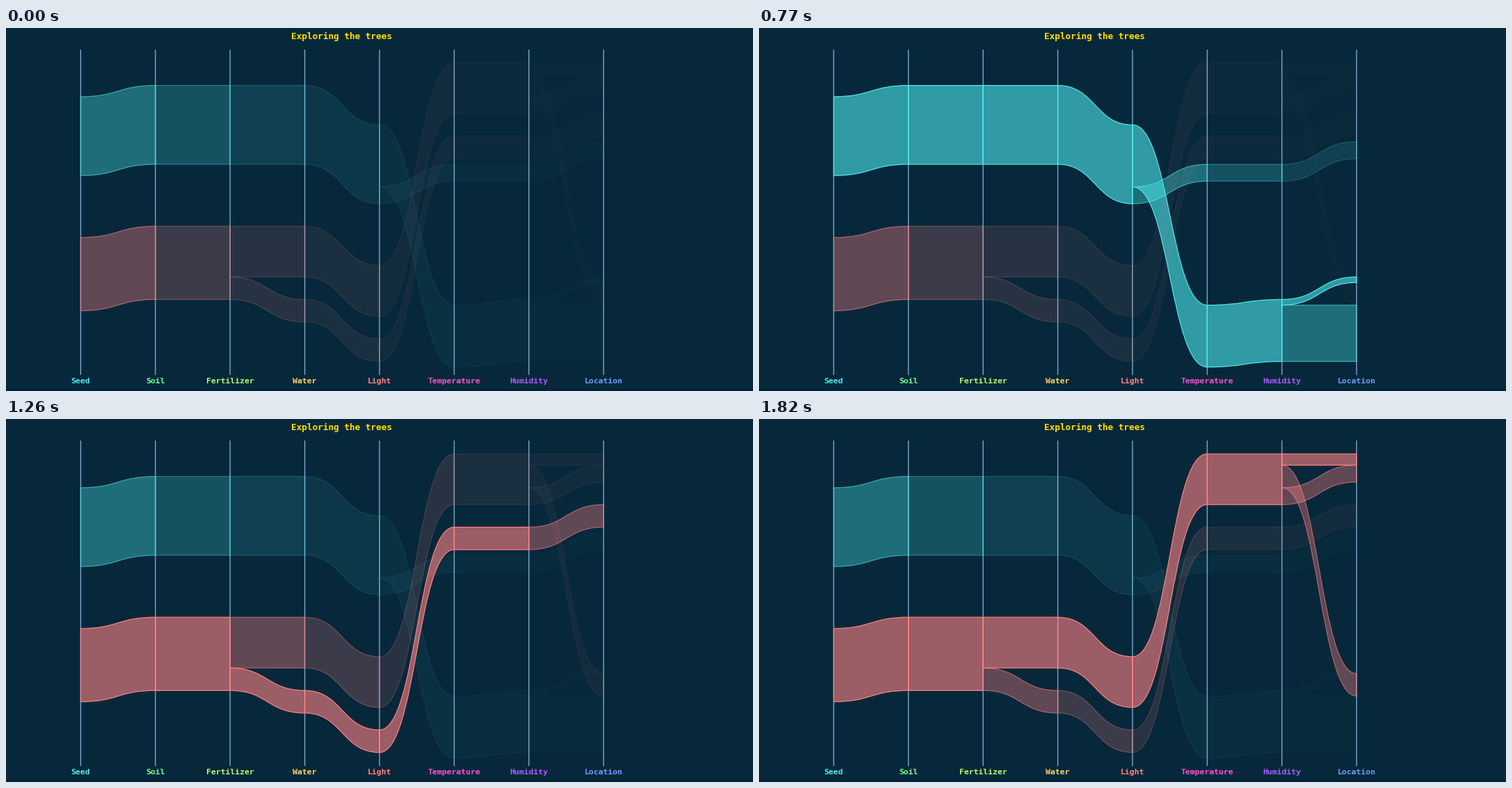
Animation of 1074 by 522 pixels, one loop 1.89 s. Source, as a matplotlib script:

```python
import matplotlib.pyplot as plt
from matplotlib.animation import FuncAnimation
from matplotlib.patches import PathPatch, Rectangle
from matplotlib.path import Path

W, H, DPI = 1074, 522, 100
STEP = 107.4           # distance between the axes
TOP, UNIT = 50.2, 8.1  # first slot and height of one item
FADE = 0.6             # opacity factor per link away from the lit path
PX = 72 / DPI          # one pixel in points

BG = "#07283a"
TEAL, RED = "#4de8ee", "#ff8284"
LABELS = [("Seed", "#4fe6f0"), ("Soil", "#78fa9c"), ("Fertilizer", "#b4fa6e"),
          ("Water", "#fad264"), ("Light", "#ff8284"), ("Temperature", "#fa50d2"),
          ("Humidity", "#aa5aff"), ("Location", "#6e9bff")]

fig = plt.figure(figsize=(W / DPI, H / DPI), dpi=DPI, facecolor=BG)
ax = fig.add_axes([0, 0, 1, 1])
ax.set_xlim(0, W)
ax.set_ylim(H, 0)
ax.axis("off")


class Node:
    """A group of items on one axis, with the ribbon leading to it."""

    def __init__(self, top, size, color, parent=None):
        self.top, self.size, self.color, self.parent = top, size, color, parent
        self.kids = []
        self.col = parent.col + 1 if parent else 0
        if parent:
            start = parent.top + sum(k.size for k in parent.kids)
            parent.kids.append(self)
            self.patch = PathPatch(ribbon(self.col, start, top, size),
                                   lw=1.2 * PX, joinstyle="round", zorder=3)
            ax.add_patch(self.patch)

    def grow(self, size, *tops):
        node = self
        for top in tops:
            node = Node(top, size, self.color, node)
        return node

    def walk(self):
        yield self
        for kid in reversed(self.kids):
            yield from kid.walk()

    def paint(self, lit):
        steps, node = 0, self
        while node.parent and node not in lit:
            steps, node = steps + 1, node.parent
        self.patch.set_facecolor((self.color, FADE ** (steps + 1)))
        self.patch.set_edgecolor((self.color, FADE ** steps))


def ribbon(col, start, end, size):
    x0, x1 = STEP * col, STEP * (col + 1)
    mid = (x0 + x1) / 2
    a, b = TOP + UNIT * start, TOP + UNIT * end
    h = UNIT * size
    points = [(x0, a), (mid, a), (mid, b), (x1, b),
              (x1, b + h), (mid, b + h), (mid, a + h), (x0, a + h), (x0, a)]
    curve = [Path.CURVE4] * 3
    return Path(points, [Path.MOVETO, *curve, Path.LINETO, *curve, Path.CLOSEPOLY])


def text(x, y, s, size, color):
    ax.text(x, y, s, color=color, fontsize=size * PX, weight="bold",
            family="DejaVu Sans Mono", ha="center", va="baseline", zorder=5)


ax.add_patch(Rectangle((0, 519), W, 3, color="#05203a", lw=0))
text(482.8, 15.6, "Exploring the trees", 12.7, "#ffdc00")
for i, (name, color) in enumerate(LABELS, 1):
    ax.plot([STEP * i] * 2, [31, 499], color="#78a8ce", lw=1.4 * PX,
            solid_capstyle="butt", snap=False, zorder=2)
    text(STEP * i, 510.8, name, 11.45, color)

# Ribbons hang below each other in the order in which they are grown.
teal = Node(6, 14, TEAL)
light = teal.grow(14, 4, 4, 4, 11)
humid = light.grow(11, 43, 42)
humid.grow(1, 38)
humid.grow(10, 43)
light.grow(3, 18, 18, 14)

red = Node(31, 13, RED)
soil = red.grow(13, 29, 29)
humid = soil.grow(9, 29, 36, 0, 0)
humid.grow(2, 0)
humid.grow(4, 39)
humid.grow(3, 2)
soil.grow(4, 42, 49, 13, 13, 9)

visits = [*teal.walk(), *red.walk()]
links = [n for n in visits if n.parent]


def update(i):
    lit, node = set(), visits[i]
    while node:
        lit.add(node)
        node = node.parent
    for link in links:
        link.paint(lit)
    return [link.patch for link in links]


anim = FuncAnimation(fig, update, frames=len(visits), interval=70,
                     init_func=lambda: update(0), repeat=True, repeat_delay=0)
plt.show()
```
